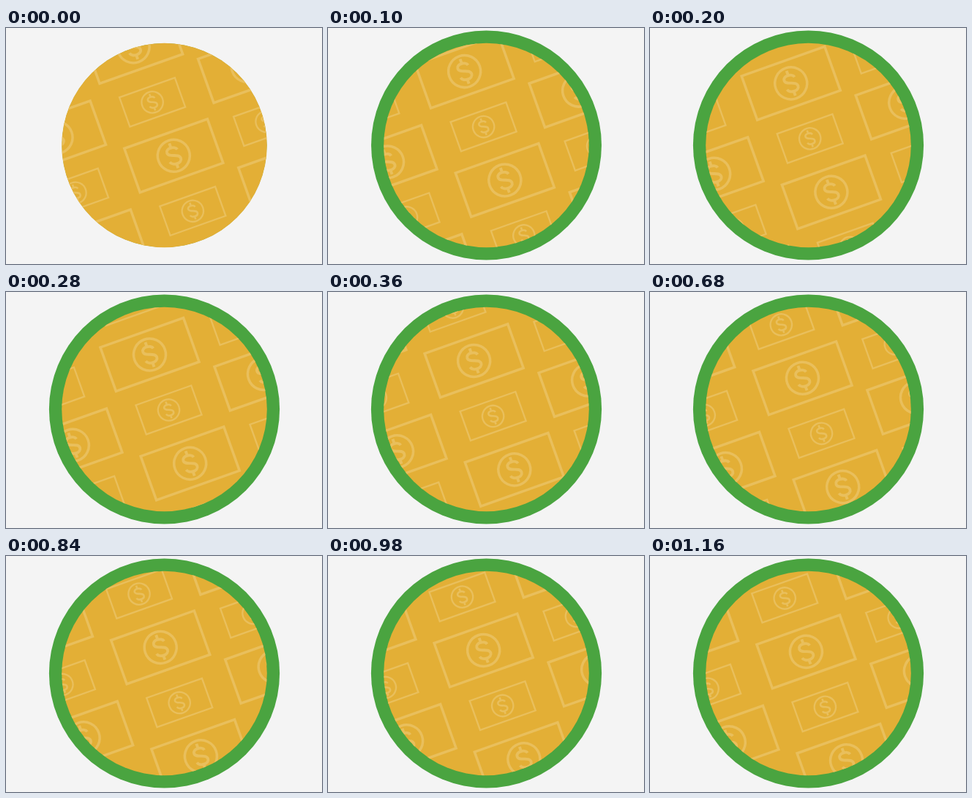
An HTML page for the animation above (1240 ms loop, 432 by 324 pixels).

```html
<!DOCTYPE html>
<html lang="en">
<head>
<meta charset="utf-8">
<title>Banknote badge</title>
<style>
  html, body { margin: 0; height: 100%; overflow: hidden; background: #f4f4f4; }
  svg { display: block; width: 432px; height: 324px; }
</style>
</head>
<body>
<svg viewBox="0 0 432 324">
  <defs>
    <clipPath id="disc"><circle cx="216.5" cy="161" r="140.3"/></clipPath>
    <g id="bill" fill="none" stroke="#e9bf5c" stroke-width="3.5">
      <rect x="-60.3" y="-32" width="120.6" height="64"/>
      <circle r="22"/>
      <path stroke-width="3.9" d="M7.5-6.5C6-12.5-7.5-13.5-7.5-6.5C-7.5 1 8-1.5 8 6.5C8 13.5-6 13.5-8 6.5M0-18V-11M0 11V18"/>
    </g>
  </defs>
  <circle id="ring" cx="216.5" cy="161" fill="#4aa440"/>
  <circle cx="216.5" cy="161" r="140.3" fill="#e3af36"/>
  <g clip-path="url(#disc)"><g id="bills"></g></g>
</svg>
<script>
const LOOP = 1240, START = 10, END = 1160, GROW = 100;
const ring = document.getElementById('ring');
const bills = document.getElementById('bills');
const clamp = v => Math.min(1, Math.max(0, v));

function addBill(x, y, scale) {
  const use = document.createElementNS('http://www.w3.org/2000/svg', 'use');
  use.setAttribute('href', '#bill');
  use.setAttribute('transform', `translate(${x} ${y}) rotate(-19.6) scale(${scale})`);
  bills.append(use);
}

// Three columns, large and small notes alternating down each one
for (const [x, y] of [[69, 150.3], [229.3, 175.3], [385.3, 201.8]]) {
  for (let row = -2; row <= 1; row++) {
    const bx = x + row * 55.2, by = y + row * 149.4;
    addBill(bx, by, 1);
    addBill(bx + 26, by + 76, 2 / 3);
  }
}

const bezier = (a, b, s) => 3 * s * (1 - s) ** 2 * a + 3 * s * s * (1 - s) * b + s ** 3;

// cubic-bezier(0, .42, .5, 1)
function ease(p) {
  let lo = 0, hi = 1;
  for (let i = 0; i < 24; i++) {
    const mid = (lo + hi) / 2;
    if (bezier(0, 0.5, mid) < p) lo = mid; else hi = mid;
  }
  return bezier(0.42, 1, lo);
}

function draw(now) {
  const t = now % LOOP;
  const slide = ease(clamp((t - START) / (END - START)));
  const grow = 1 - (1 - clamp((t - START) / GROW)) ** 2;
  bills.setAttribute('transform', `translate(${39.3 * slide} ${105.5 * slide})`);
  ring.setAttribute('r', 140 + 17.6 * grow);
  requestAnimationFrame(draw);
}
const origin = performance.now();
(function tick() {
  draw(0);
})();
</script>
</body>
</html>
```
